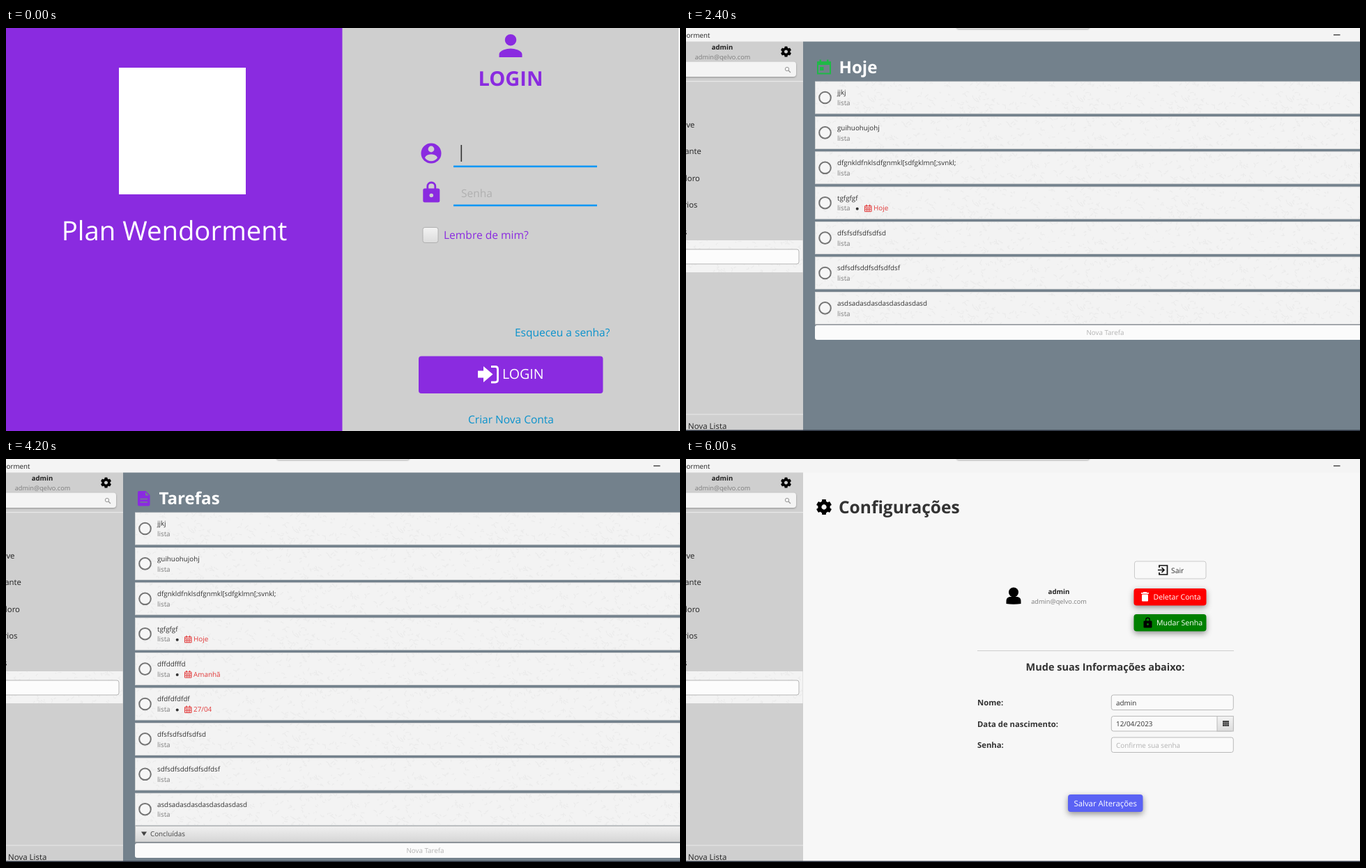
An HTML page that plays this animation: 967 px wide and 579 px high, repeating every 6.6 s.

```html
<!DOCTYPE html>
<html lang="pt">
<head>
<meta charset="utf-8">
<title>Tarefas</title>
<style>
html, body { margin: 0; width: 100%; height: 100%; overflow: hidden; background: #fff; }
svg { display: block; width: 967px; height: 579px; }
text { font-family: "Open Sans", "Noto Sans", sans-serif; text-rendering: geometricPrecision; white-space: pre; }
.scene { visibility: hidden; animation: show 6.6s step-end infinite; }
.lift { filter: drop-shadow(0 3px 4.5px rgba(0, 0, 0, .42)); }
.soft { filter: drop-shadow(0 1px 1px rgba(0, 0, 0, .3)); }
@keyframes show {
  0% { visibility: visible; }
  9.09091%, 100% { visibility: hidden; }
}
</style>
</head>
<body>
<svg id="stage" viewBox="0 0 967 579" xmlns="http://www.w3.org/2000/svg"></svg>
<script>
const PURPLE = '#8a2be0', SLATE = '#73818c', PANEL = '#cfcfcf', INK = '#333', MUTED = '#7d7d7d';
const GREEN = '#1fb947', RED = '#e23b3b', TEAL = '#1ec8b6', PAGE = '#f7f7f7';
const APP = 'Plan Wendorment', MAIL = 'admin@qelvo.com';

const text = (x, y, s, size, fill = INK, anchor = 'start', weight = 400) =>
  `<text x="${x}" y="${y}" font-size="${size}" fill="${fill}" text-anchor="${anchor}" font-weight="${weight}">${s}</text>`;
const mid = (x, y, s, size, fill, weight) => text(x, y, s, size, fill, 'middle', weight);
const bold = (x, y, s, size, fill) => text(x, y, s, size, fill, 'start', 700);
const box = (x, y, w, h, fill, extra = '') =>
  `<rect x="${x}" y="${y}" width="${w}" height="${h}" fill="${fill}" ${extra}/>`;
const dot = (x, y, r, fill, extra = '') => `<circle cx="${x}" cy="${y}" r="${r}" fill="${fill}" ${extra}/>`;
const path = (d, fill, extra = '') => `<path d="${d}" fill="${fill}" ${extra}/>`;
const line = (d, stroke, width, extra = '') => path(d, 'none', `stroke="${stroke}" stroke-width="${width}" ${extra}`);
const at = (x, y, scale, body) => `<g transform="translate(${x} ${y}) scale(${scale})">${body}</g>`;

// Icons
const PERSON = 'M12 12a4 4 0 1 0 0-8 4 4 0 0 0 0 8zm0 2c-2.67 0-8 1.34-8 4v2h16v-2c0-2.66-5.33-4-8-4z';
const HISTORY = 'M13 3a9 9 0 0 0-9 9H1l4 4 4-4H6a7 7 0 1 1 2.06 4.94l-1.42 1.42A9 9 0 1 0 13 3zm-1 5v5l4.28 2.54.72-1.21-3.5-2.08V8z';

const gear = (x, y, r) => {
  let teeth = '';
  for (let a = 0; a < 360; a += 60) teeth += box(-r * .27, -r, r * .54, r * .5, '#000', `rx="${r * .08}" transform="rotate(${a})"`);
  return at(x, y, 1, teeth + dot(0, 0, r * .56, 'none', `stroke="#000" stroke-width="${r * .46}"`));
};
const padlock = (x, y, s, fill, hole) => at(x, y, s,
  box(0, 10, 24, 20, fill, 'rx="2.5"') + line('M6.5 11V7a5.5 5.5 0 0 1 11 0v4', fill, 2.8) + dot(12, 20, 2.8, hole));
const account = (x, y) => dot(x, y, 14.5, PURPLE) + dot(x, y - 6, 4.4, PANEL) +
  path(`M${x - 9} ${y + 6.5}c1-4 6-5 9-5s8 1 9 5a11 11 0 0 1-18 0z`, PANEL);
const star = (x, y, r, stroke) => {
  const pts = Array.from({ length: 10 }, (_, i) => {
    const a = i * Math.PI / 5, d = i % 2 ? r * .42 : r;
    return `${(x + d * Math.sin(a)).toFixed(2)},${(y - d * Math.cos(a)).toFixed(2)}`;
  });
  return `<polygon points="${pts.join(' ')}" fill="none" stroke="${stroke}" stroke-width="2" stroke-linejoin="round"/>`;
};
const calendar = fill => line('M189 49.5h18v16h-18z', fill, 2) + box(188, 48, 20, 5, fill) +
  box(191.5, 45.5, 2.5, 4, fill) + box(202, 45.5, 2.5, 4, fill) + box(192, 56, 5.5, 5, fill);
const smallCalendar = (x, y) => at(x, y, 1, line('M.5 2h9.5v8H.5z M.5 4.5H10 M3.7 4.5V10 M6.8 4.5V10 M.5 7.2H10', RED, 1) +
  line('M3 0v3M7.5 0v3', RED, 1.4));
const page = path('M191 46h9.5l6 6v13.5q0 2-2 2H191q-2 0-2-2V48q0-2 2-2z', PURPLE) +
  line('M192.5 57.5h10.5M192.5 62h10.5', SLATE, 1.6) + path('M200 47.5V52.5h5z', SLATE);
const bars = [48, 55, 62].map(y => box(185, y, 22.5, 3.8, TEAL)).join('');
const exitIcon = line('M679 156v-3h11.5v13H679v-3', '#111', 1.7) + line('M677 159.5h8.5M682.5 156l3.5 3.5-3.5 3.5', '#111', 1.7);
const bin = box(654, 194.5, 9, 10, '#fff', 'rx="1"') + box(653, 192, 11, 1.7, '#fff') + box(656, 191, 5, 1.5, '#fff');

// Sign-in screens
const caret = (x, y, h) => box(x, y, 1.6, h, '#333');
const bigButton = (y, label) => box(592, y, 264.5, 52, PURPLE, 'rx="5" class="lift"') + mid(724.5, y + 33, label, 20, '#fff');
const backButton = y => box(593, y, 262.5, 50, '#fff', 'rx="5" class="soft"') + mid(724.5, y + 32, 'VOLTAR', 20.3, '#222');
const input = (x, y, w, focus) => box(x, y, w, 34, '#fff', `rx="3" stroke="${focus ? '#1ba3d2' : '#bbb'}" stroke-width="${focus ? 2 : 1}"`);
const combo = (x, y) => box(x, y, 83.5, 34, 'url(#button)', 'rx="3" stroke="#b4b4b4"') + path(`M${x + 62} ${y + 13.5}h11.5l-5.7 6z`, '#444');
const heading = (s, size, y = 82) => mid(724, y, s, size, PURPLE, 700);
const user = at(699.3, .7, 2.06, path(PERSON, PURPLE));
const clock = at(700, 0, 2, path(HISTORY, PURPLE));

const signIn = (body, bg = PANEL) => box(0, 0, 967, 579, '#fff') + box(0, 0, 483, 579, PURPLE) + box(482.5, 0, 482.5, 579, bg) +
  box(162, 57, 182, 182, '#fff') + mid(241.5, 305, APP, 38.3, '#fff') + body;

const login = signIn(user + heading('LOGIN', 29, 83) + account(610, 180) + caret(652.5, 168, 24) +
  box(642, 197.6, 206, 2.6, '#0a97f5') + padlock(598.3, 220.5, 1, PURPLE, PANEL) +
  text(653, 243, 'Senha', 15.5, '#b0b0b0') + box(642, 253.6, 206, 2.6, '#0a97f5') +
  box(598, 286.5, 22, 22, 'url(#button)', 'rx="3" stroke="#b0b0b0"') + text(628, 303, 'Lembre de mim?', 15.6, PURPLE) +
  text(730, 443, 'Esqueceu a senha?', 15.5, '#0a92cc') + box(592, 471.5, 264.5, 53.5, PURPLE, 'rx="4"') +
  path('M677 492.5h8v-6.5l13.5 11.5-13.5 11.5v-6.5h-8z', '#fff') +
  line('M696 486.5h6q3.5 0 3.5 3.5v15.5q0 3.5-3.5 3.5h-6', '#fff', 2.8) +
  text(712, 504, 'LOGIN', 19.6, '#fff') + mid(724.5, 568, 'Criar Nova Conta', 15.5, '#0a92cc'));

const signUpRows = ['Nome', 'Email', 'Data de nascimento', 'Senha'];
const signUp = signIn(user + heading('CRIAR NOVA CONTA', 29.8) + signUpRows.map((s, i) => {
  const y = 134 + i * 62;
  return text(526, y + 24, s, 17.4, PURPLE) + input(714, y, i === 1 ? 121 : 206, i === 0) + (i === 1 ? combo(835, y) : '');
}).join('') + caret(724, 139, 24) + bigButton(421, 'CADASTRAR') + backButton(489));

const forgot = signIn(clock + heading('ESQUECEU A SENHA', 29.9) + text(589.5, 281, 'Email', 17.4, PURPLE) +
  input(714, 257, 122, true) + caret(724, 262, 24) + combo(835.5, 256.5) + bigButton(385, 'CONTINUAR') + backButton(453));

const newPass = signIn(clock + heading('MUDAR SENHA', 29.9) + text(589.5, 221, 'Senha', 17.4, PURPLE) + input(714, 197, 206, true) +
  caret(724, 202, 24) + text(589.5, 281, 'Confirmar', 17.4, PURPLE) + input(714, 257, 206) +
  bigButton(385, 'CONTINUAR') + backButton(453), '#cecece');

// Main window
const side = [['Em breve', 12.5], ['Importante', 22], ['Pomodoro', 20], ['Calendários', 16.5], ['Tarefas', 1.5]];
const frame = (body, bg = SLATE, ink = '#222') => box(0, 0, 967, 579, bg) + box(0, 19, 168, 560, PANEL) +
  box(0, 0, 967, 19.5, '#f4f4f4') + box(388, -6, 191, 7, '#e6e6e6', 'rx="4" class="soft"') +
  text(34.5, 13.5, APP, 9.8, ink, 'end') + box(929, 9.3, 9.5, 1.2, ink) +
  mid(52, 31, 'admin', 9.6, '#222', 700) + mid(52.5, 44.5, MAIL, 9.2, MUTED) + gear(143.5, 34, 7.6) +
  box(-10, 48.5, 168, 21.5, '#f4f4f4', 'rx="4" class="soft"') + dot(145, 59, 2.7, 'none', 'stroke="#999"') +
  line('M147 61l3 3', '#999', 1.3) + box(0, 76, 168, 1.2, '#e8e8e8') +
  side.map(([s, x], i) => text(x, 143 + i * 38.4, s, 11.4, '#222', 'end')).join('') +
  box(0, 305, 167.5, 46, 'url(#doodle)') + box(-10, 318, 172, 21, '#fcfcfc', 'rx="3" stroke="#b5b5b5"') +
  box(0, 554.5, 168, 1.2, '#e6e6e6') + text(3, 575.5, 'Nova Lista', 11.5, '#222') + body +
  box(0, 577.5, 967, 1.5, '#2c3340');

const title = (icon, s, x = 219.5, fill = '#fff') => icon + bold(x, 65, s, 24.1, fill);
const task = ([name, due], i) => {
  const y = 77 + i * 50.4;
  return box(185.5, y, 790, 46, 'url(#doodle)', 'stroke="#dcdcdc" stroke-width=".8"') +
    dot(199.5, y + 23, 8.3, '#f6f6f6', 'stroke="#757575" stroke-width="2"') +
    text(217, y + 19.3, name, 9.8) + text(217, y + 34.2, 'lista', 9.8, MUTED) +
    (due ? dot(245.7, y + 31.5, 2, INK) + smallCalendar(256, y + 25.5) + text(269, y + 34.2, due, 9.9, RED) : '');
};
const tasks = list => list.map(task).join('');
const below = n => 77 + n * 50.4 - 3.6;
const newTask = y => box(185, y - 1.3, 790, 1.3, '#8b9096') + box(185, y, 790, 21, '#fbfbfb', 'rx="3"') +
  mid(601.5, y + 14, 'Nova Tarefa', 9.8, '#b3b3b3');
const doneBar = y => box(185.5, y, 790, 22.5, 'url(#bar)', 'stroke="#bdbdbd" stroke-width=".8"') +
  path(`M194 ${y + 8}h8l-4 6z`, '#444') + text(207, y + 14.2, 'Concluídas', 9.8, '#444');
const doneTask = (name, i) => {
  const y = 327 + i * 46;
  return dot(208.5, y + .3, 9.2, '#0878d6') + line(`M204 ${y + .5}l3.4 3.8 6-8`, '#fff', 1.8) +
    text(226, y - 3.5, name, 9.8) + text(226, y + 11.3, 'lista', 9.8, MUTED);
};

const first = [['jjkj'], ['guihuohujohj'], ['dfgnkldfnklsdfgnmkl[sdfgklmn[;svnkl;']];
const today = ['tgfgfgf', 'Hoje'];
const later = [['dffddfffd', 'Amanhã'], ['dfdfdfdfdf', '27/04']];
const starred = [['dfsfsdfsdfsdfsd'], ['sdfsdfsddfsdfsdfdsf']];
const last = ['asdsadasdasdasdasdasdasd'];

const listPage = (head, list, ink) => frame(head + tasks(list) + newTask(below(list.length) + .8), SLATE, ink);
const todayPage = listPage(title(calendar(GREEN), 'Hoje'), [...first, today, ...starred, last]);
const soonPage = listPage(title(calendar(RED), 'Em Breve'), later);
const starPage = listPage(title(star(198, 57.5, 10, '#f4e650'), 'Importante'), starred, '#929292');
const allPage = frame(title(page, 'Tarefas') + tasks([...first, today, ...later, ...starred, last]) +
  doneBar(527.5) + newTask(552));

const timerPage = frame(dot(198, 57, 9.5, RED) + bold(219.5, 65, 'Pomodoro', 24.1, INK) +
  dot(567, 285, 105, 'none', 'stroke="#dedede" stroke-width="9"') + mid(567, 302, '25:00', 48, INK) +
  box(515, 430, 104, 28, RED, 'rx="4" class="lift"') + mid(567, 448, 'Iniciar', 11.5, '#fff'), PAGE);

const customPage = frame(title(bars, 'tilva', 216, TEAL) + tasks([...first, ['dsdsdsd']]) +
  box(185.5, 296, 790, 154.5, 'url(#doodle)', 'stroke="#cfcfcf"') + doneBar(275) +
  ["kjklskd'l;", 'fdfdsfsddfsdfsd', 'ddsasd'].map(doneTask).join('') +
  box(186, 452.7, 790, 19.3, '#fbfbfb', 'rx="2" stroke="#1a9fce" stroke-width="1.8"') + caret(600.6, 456, 13.5));

// Settings
const action = (y, fill, label, x) => box(642.5, y, 104, 24.5, fill, 'rx="4" class="lift"') + text(x, y + 16.2, label, 10.6, '#fff');
const field = (y, label, value, fill = INK) => bold(418, y + 15.3, label, 11.3, INK) +
  box(610.3, y, 175, 21.5, '#fafafa', 'rx="3" stroke="#b9b9b9"') + text(617, y + 14.7, value, 9.9, fill);
const settingsPage = frame(gear(198, 69, 11) + bold(219, 77.7, 'Configurações', 24.5, INK) +
  dot(470, 191.5, 7, '#000') + path('M459.5 208v-4q0-5 5-6h11q5 1 5 6v4q-10.5 1.5-21 0z', '#000') +
  mid(535, 193.5, 'admin', 9.7, '#222', 700) + mid(535, 207.5, MAIL, 9.2, MUTED) +
  box(643.5, 147, 102.5, 25, '#f9f9f9', 'rx="3" stroke="#cacaca"') + exitIcon + text(696, 163.5, 'Sair', 10.4) +
  action(186, '#fe0000', 'Deletar Conta', 670.5) + bin +
  action(223, '#008000', 'Mudar Senha', 675) + padlock(656.5, 227.5, .5, '#000', '#008000') +
  box(418, 275, 368, 1, '#cfcfcf') + mid(601.5, 303.5, 'Mude suas Informações abaixo:', 14.5, INK, 700) +
  field(339, 'Nome:', 'admin') + field(369.5, 'Data de nascimento:', '12/04/2023') +
  box(762, 369.5, 23.3, 21.5, 'url(#button)', 'stroke="#b9b9b9"') +
  box(770, 376, 9, 8, '#444') + line('M770 378.5h9M770 381h9M773 378v6M776 378v6', '#aaa', .5) +
  field(400, 'Senha:', 'Confirme sua senha', '#b3b3b3') +
  box(548, 482, 107.5, 25, '#5a62f4', 'rx="4" class="lift"') + mid(601.7, 498.5, 'Salvar Alterações', 11.4, '#fff'), PAGE);

// Faint paper texture made of seeded short strokes
let seed = 7;
const rnd = n => (seed = seed * 16807 % 2147483647) / 2147483647 * n;
const spread = n => (rnd(n) - n / 2).toFixed(1);
let marks = '';
for (let i = 0; i < 330; i++) {
  marks += `M${rnd(150).toFixed(1)} ${rnd(150).toFixed(1)}q${spread(6)} ${spread(6)} ${spread(10)} ${spread(8)}`;
}
const fade = (id, a, b) => `<linearGradient id="${id}" x2="0" y2="1"><stop stop-color="${a}"/><stop offset="1" stop-color="${b}"/></linearGradient>`;
const defs = `<defs>${fade('button', '#f3f3f3', '#dcdcdc')}${fade('bar', '#f0f0f0', '#d6d6d6')}
  <pattern id="doodle" width="150" height="150" patternUnits="userSpaceOnUse">${box(0, 0, 150, 150, '#f3f3f3')}${line(marks, '#ebebeb', 1.1)}</pattern></defs>`;

const STEP = 600, LOOP = 6600;
const scenes = [login, signUp, forgot, newPass, todayPage, soonPage, starPage, allPage, timerPage, customPage, settingsPage];
document.getElementById('stage').innerHTML = defs + scenes.map((body, i) =>
  `<g class="scene" style="animation-delay:${i ? i * STEP - LOOP : 0}ms">${body}</g>`).join('');
</script>
</body>
</html>
```
